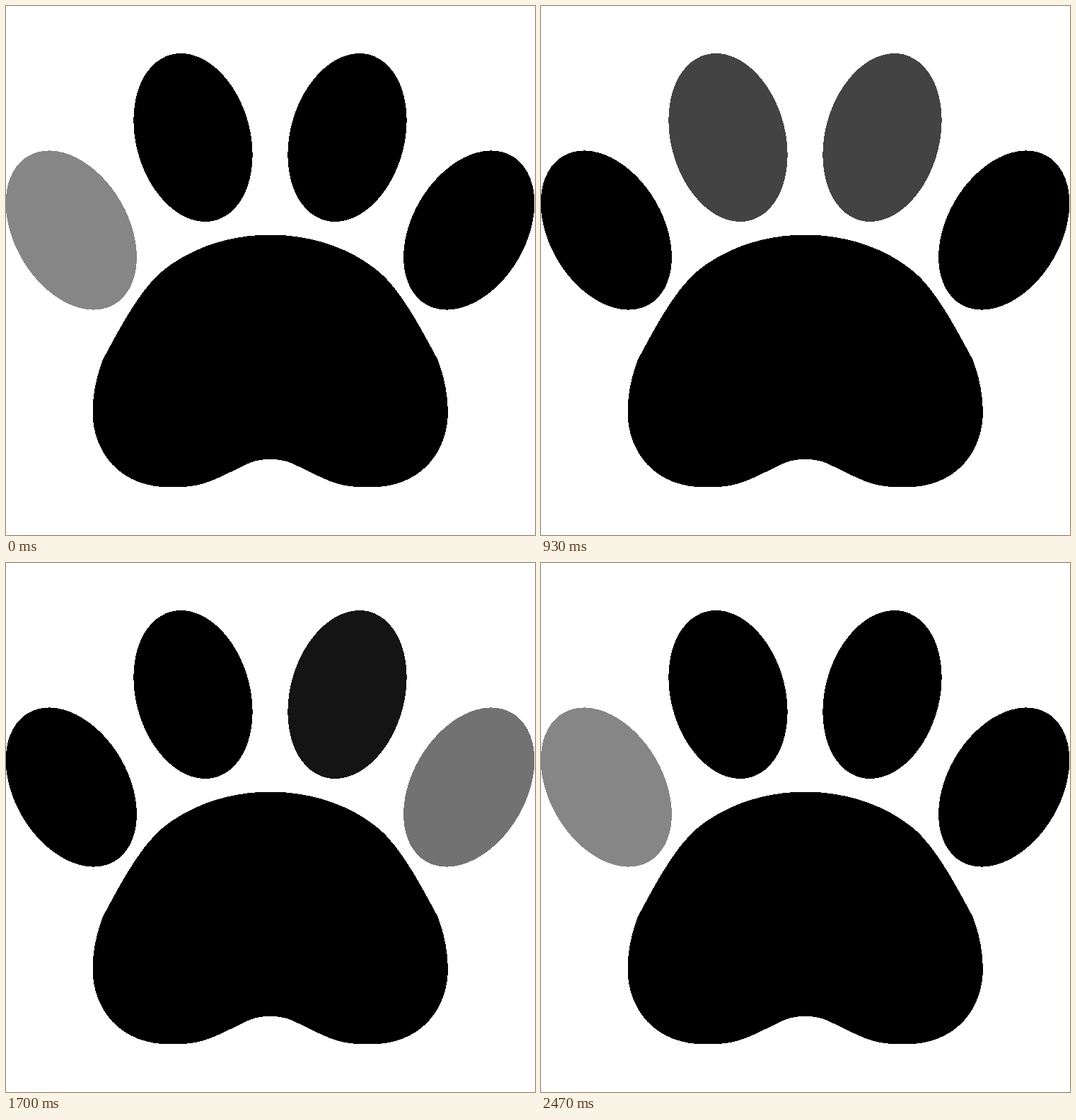
Animation, 748 px wide and 748 px high, one loop 2640 ms. Source, as an HTML page without scripts:

```html
<!DOCTYPE html>
<html lang="en">
<head>
<meta charset="utf-8">
<title>Paw loader</title>
<style>
  @property --k { syntax: "<number>"; inherits: false; initial-value: 0; }

  html, body { margin: 0; width: 100%; height: 100%; overflow: hidden; background: #fff; }
  svg { display: block; width: 100%; height: 100%; shape-rendering: crispEdges; }

  /* --k counts 12 steps from black to grey, eased along a cosine */
  .toe {
    --v: calc(67 * (1 - cos(var(--k) * 15deg)));
    fill: rgb(var(--v), var(--v), var(--v));
    animation: 2640ms steps(12) -1ms infinite;
  }
  .t1 { animation-name: first; }
  .t2 { animation-name: second; }
  .t3 { animation-name: third; }
  .t4 { animation-name: fourth; }

  @keyframes first {
    0%, 1.51515% { --k: 12; }
    19.69697%, 75.37879% { --k: 0; }
    93.56061%, 100% { --k: 12; }
  }
  @keyframes second {
    0%, 1.51515% { --k: 0; }
    19.69697%, 26.13636% { --k: 12; }
    44.31818%, 100% { --k: 0; }
  }
  @keyframes third {
    0%, 26.13636% { --k: 0; }
    44.31818%, 50.75758% { --k: 12; }
    68.93939%, 100% { --k: 0; }
  }
  @keyframes fourth {
    0%, 50.75758% { --k: 0; }
    68.93939%, 75.37879% { --k: 12; }
    93.56061%, 100% { --k: 0; }
  }
</style>
</head>
<body>
<svg viewBox="0 0 748 748">
  <defs>
    <path id="half" d="M376 323.5H373.7C312 323.5 252 345 212 383C184 412 161 455 137 500
      C128 523 122.5 549 122.5 574C122.5 603 132.5 629 150.5 648.5C172 671 200 680.5 233 680.5
      C250 680.5 266 679.5 280 675C303 668 331 651 350 644C358 641.5 366 641 373.7 641H376Z"/>
  </defs>
  <use href="#half"/>
  <use href="#half" transform="translate(747.4) scale(-1 1)"/>
  <ellipse class="toe t1" rx="80.8" ry="121.3" transform="translate(92.3 317) rotate(-30)"/>
  <ellipse class="toe t2" rx="80.8" ry="121.3" transform="translate(264.5 186) rotate(-15)"/>
  <ellipse class="toe t3" rx="80.8" ry="121.3" transform="translate(482.5 186) rotate(15)"/>
  <ellipse class="toe t4" rx="80.8" ry="121.3" transform="translate(654.7 317) rotate(30)"/>
</svg>
</body>
</html>
```
